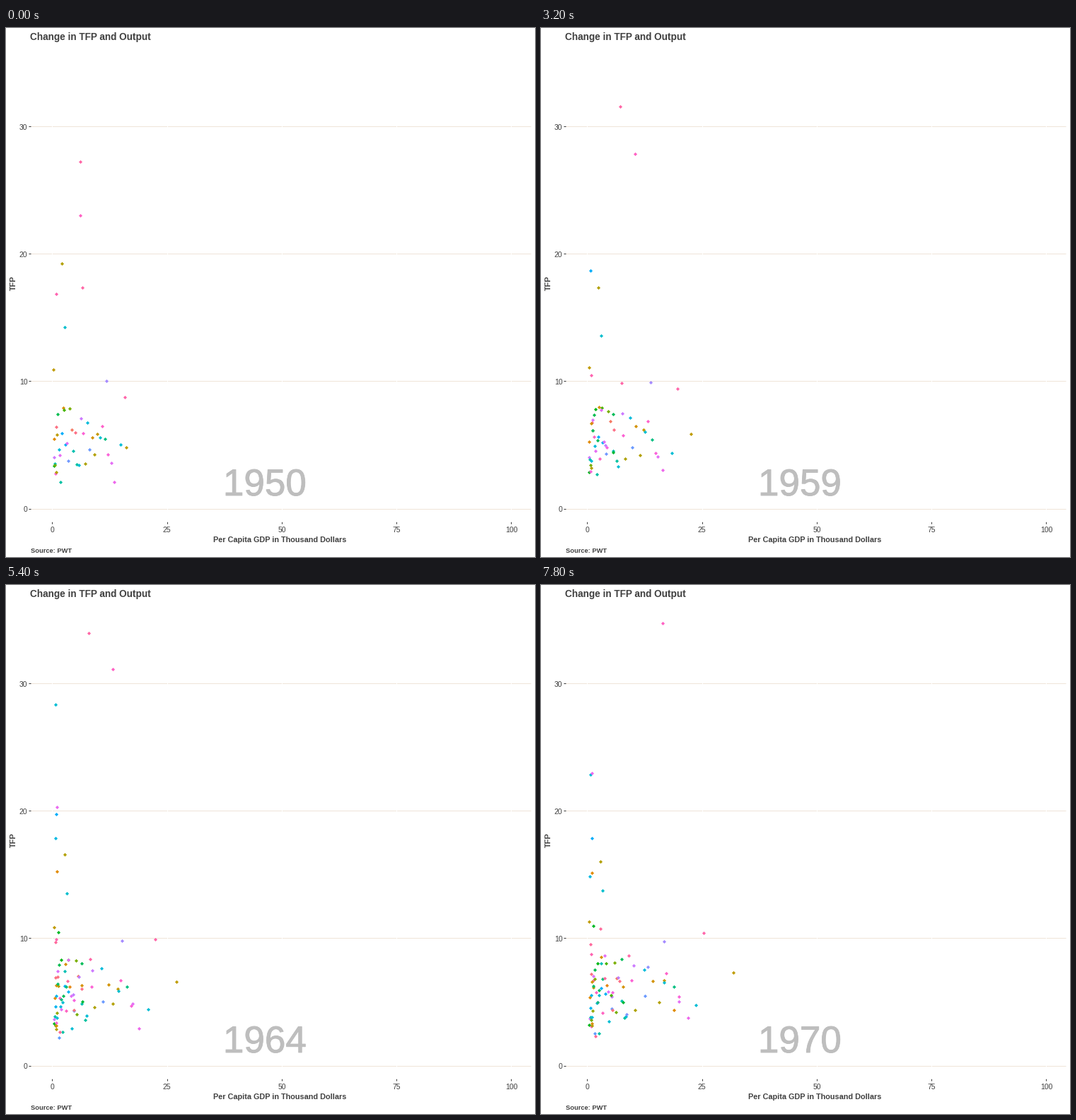
Animation, 748 px wide and 748 px high, one loop 8000 ms. Source, as a matplotlib script:

```python
import math

import matplotlib.patheffects as pe
import matplotlib.pyplot as plt
import numpy as np
from matplotlib.animation import FuncAnimation

SIZE, DPI = 748, 100
FRAMES, STEP_MS = 40, 200
LAST = FRAMES - 1
YEARS_PER_FRAME = 0.508
INK, TICK, GRID, YEAR_GREY = "#404040", "#333333", "#EFE4D8", "#BEBEBE"

# Outliers: hue, first and last frame, GDP at both ends, evenly timed TFP keys.
OUTLIERS = [
    (350, 0, 34, 6.1, 8.5, (27.2, 30, 31.4, 31.7, 34, 34)),
    (335, 0, LAST, 6.1, 16.4, (23, 34.7)),
    (78, 0, LAST, 2.1, 2.9, (19.2, 16.9, 16)),
    (345, 0, LAST, 0.8, 0.9, (16.8, 10.6, 10, 8.7)),
    (350, 0, LAST, 6.5, 9, (17.3, 8.2, 8.6)),
    (200, 0, LAST, 2.7, 3.3, (14.2, 13.4, 13.7)),
    (348, 0, LAST, 15.8, 25.3, (8.7, 10.4)),
    (70, 0, LAST, 16.1, 31.8, (4.8, 7.3)),
    (205, 0, LAST, 14.9, 23.6, (5, 4.2, 4.7)),
    (272, 0, LAST, 11.8, 16.7, (10, 9.7)),
    (235, 9, LAST, 0.7, 1, (18.8, 18.6, 20, 17.8)),
    (205, 20, LAST, 0.7, 0.7, (31.5, 22.8)),
    (305, 20, LAST, 1, 1, (22.4, 19.5, 22.9)),
    (215, 20, LAST, 0.7, 0.6, (23, 16, 14.8)),
    (42, 20, LAST, 0.9, 1, (15.3, 15.1)),
]


def px(size):
    return size * 72 / DPI


def x_at(gdp):
    return 65.5 + 6.49 * gdp


def y_at(tfp):
    return 679.1 - 18.02 * tfp


def hcl(hue, chroma=100, lum=65):
    """Colour of equal lightness from polar CIE LUV."""
    a = math.radians(hue)
    u = chroma * math.cos(a) / (13 * lum) + 0.1978
    v = chroma * math.sin(a) / (13 * lum) + 0.4683
    y = ((lum + 16) / 116) ** 3
    xyz = np.array([y * 9 * u / (4 * v), y, y * (12 - 3 * u - 20 * v) / (4 * v)])
    to_rgb = np.array([[3.2406, -1.5372, -0.4986],
                       [-0.9689, 1.8758, 0.0415],
                       [0.0557, -0.2040, 1.0570]])
    lin = np.clip(to_rgb @ xyz, 0, 1)
    return np.where(lin > 0.0031308, 1.055 * lin ** (1 / 2.4) - 0.055, 12.92 * lin)


class Outlier:
    def __init__(self, hue, first, last, gdp0, gdp1, keys):
        self.color, self.first, self.last = hcl(hue), first, last
        self.gdp, self.keys = (gdp0, gdp1), keys
        self.times = np.linspace(first, last, len(keys))

    def at(self, frame):
        return (np.interp(frame, (self.first, self.last), self.gdp),
                np.interp(frame, self.times, self.keys))


class Country:
    """Steady growth in GDP, slow wobble and drift in TFP."""

    def __init__(self, rng, hue, first, gdp, tfp, growth, drift):
        self.color, self.first, self.last = hcl(hue), first, LAST
        self.gdp, self.tfp = gdp, tfp
        self.growth, self.drift = growth, drift
        self.phase = rng.uniform(0, 2 * math.pi)
        self.speed = rng.uniform(0.15, 0.4)

    def at(self, frame):
        t = (frame - self.first) / LAST
        wobble = 0.25 * math.sin(self.speed * frame + self.phase)
        return self.gdp * self.growth ** t, self.tfp + self.drift * t + wobble


def cohort(rng, count, first, low, spread, mean, sd):
    """Countries entering together, most of them poor."""
    group = []
    for i in range(count):
        rank = (i + 0.5) / count
        gdp = low + spread * rank ** 2
        tfp = np.clip(rng.normal(mean, sd), 2.3, 11)
        growth = rng.uniform(1.15, 1.4) + 0.4 * rank
        hue = 15 + 360 * rng.random()
        group.append(Country(rng, hue, first, gdp, tfp, growth, 1.2 * rank))
    return group


rng = np.random.default_rng(1950)
dots = [Outlier(*row) for row in OUTLIERS]
dots += cohort(rng, 40, 0, 0.3, 13.5, 5.4, 1.6)
dots += cohort(rng, 6, 5, 0.7, 5, 5.5, 1.8)
dots += cohort(rng, 7, 9, 0.8, 5, 5, 1.8)
dots += cohort(rng, 20, 20, 0.6, 5.5, 6, 2.3)
dots += cohort(rng, 6, 36, 1.5, 20, 6.5, 3)

fig = plt.figure(figsize=(SIZE / DPI, SIZE / DPI), dpi=DPI, facecolor="white")
ax = fig.add_axes([0, 0, 1, 1])
ax.set(xlim=(0, SIZE), ylim=(SIZE, 0))
ax.axis("off")


def label(x, y, text, size, color=INK, **kw):
    kw = {"ha": "left", "va": "baseline", **kw}
    return ax.text(x, y, text, fontsize=px(size), color=color,
                   family="Liberation Sans", **kw)


def line(xs, ys, color, z=1):
    ax.plot(xs, ys, color=color, lw=px(1), zorder=z, solid_capstyle="butt")


for tfp in range(0, 40, 10):
    y = math.floor(y_at(tfp)) + 0.5
    line((35, 742), (y, y), GRID)
    line((32, 35), (y, y), TICK)
    label(30.5, y + 5, str(tfp), 10.4, ha="right")
for gdp in range(0, 125, 25):
    x = x_at(gdp)
    line((x, x), (20, 698), "white", 2)
    line((x, x), (698, 701), TICK)
    label(x, 713, str(gdp), 10.4, ha="center")

label(34.5, 17, "Change in TFP and Output", 13.65, weight="bold")
label(387.5, 727, "Per Capita GDP in Thousand Dollars", 10.85,
      weight="bold", ha="center")
label(35.5, 742.5, "Source: PWT", 9.25, weight="bold")
label(11, 360.5, "TFP", 11, weight="bold", ha="center", va="center", rotation=90)
year = label(366, 661, "1950", 53, YEAR_GREY, ha="center", zorder=3)
year.set_path_effects([pe.withStroke(linewidth=px(0.9), foreground=YEAR_GREY)])
points = ax.scatter([], [], s=px(3.6) ** 2, marker="D", linewidths=0, zorder=4)


def draw(frame):
    alive = [d for d in dots if d.first <= frame <= d.last]
    spots = [d.at(frame) for d in alive]
    points.set_offsets([(round(x_at(g)) + 0.5, round(y_at(t)) + 0.5)
                        for g, t in spots])
    points.set_facecolor([d.color for d in alive])
    year.set_text(str(1950 + math.ceil(frame * YEARS_PER_FRAME)))
    return points, year


anim = FuncAnimation(fig, draw, frames=FRAMES, interval=STEP_MS,
                     repeat=True, repeat_delay=0, blit=False)
plt.show()
```
